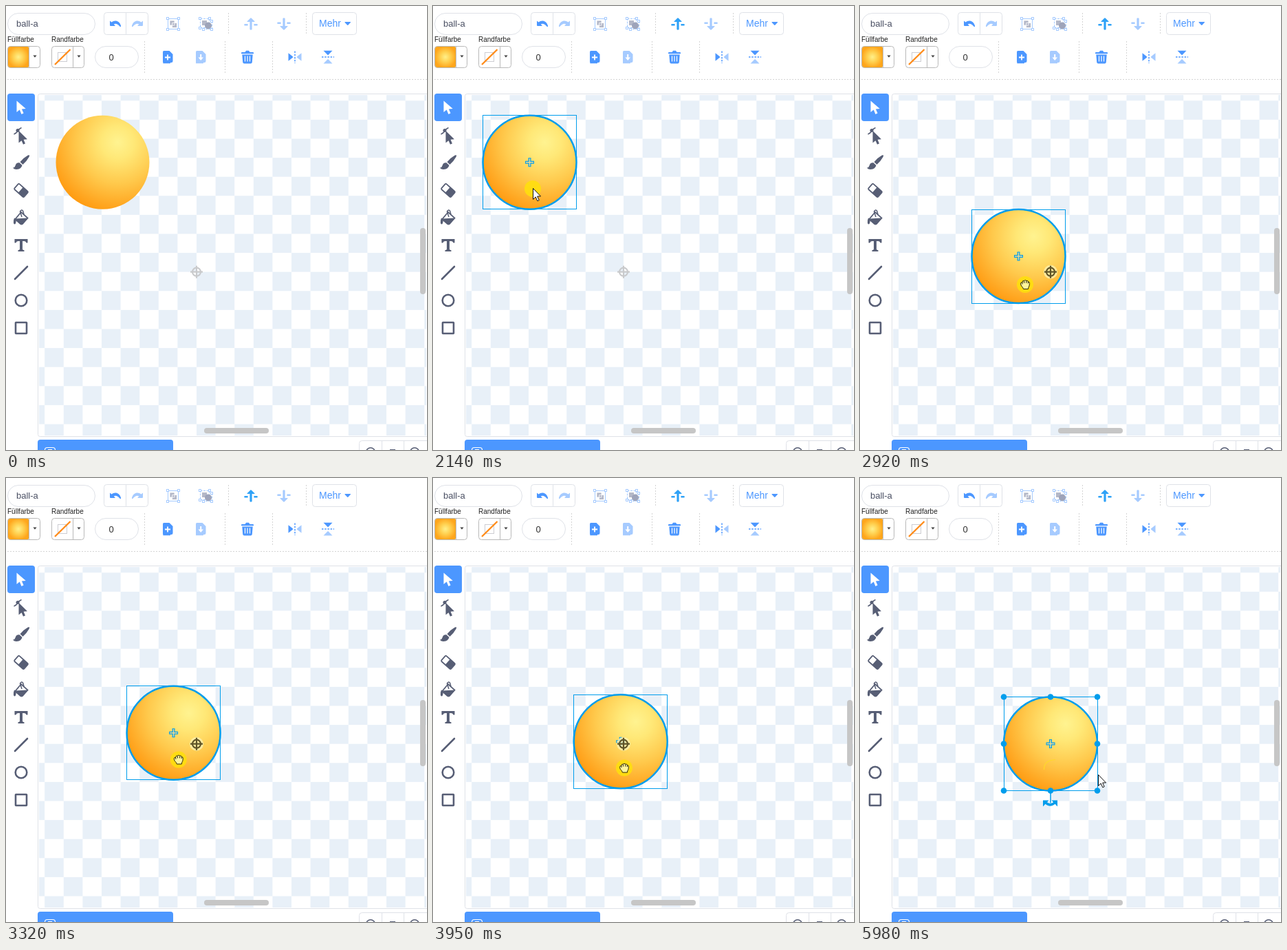
An HTML page for the animation above (6600 ms loop, 612 by 644 pixels).

```html
<!DOCTYPE html>
<html lang="de">
<head>
<meta charset="utf-8">
<title>Ball zentrieren</title>
<style>
  html, body { margin: 0; width: 100%; height: 100%; overflow: hidden; background: #fff; }
  svg { display: block; font-family: "Liberation Sans", Arial, sans-serif; }
  .frame { fill: #fff; stroke: #dfe2e8; }
  .swatch { fill: none; stroke: #b9b9b9; }
  .dash { stroke: #d4d4d4; stroke-dasharray: 2 2; fill: none; }
  .blue { fill: #4c97ff; }
  .pale { fill: #a6cbff; }
  .bar { fill: #c6c6c6; }
  .tool { fill: #575e75; }
  .pen { fill: none; stroke: #575e75; stroke-width: 2.6; }
  .sel { fill: none; stroke: #009dec; }
  .crisp { shape-rendering: crispEdges; }
</style>
</head>
<body>
<svg width="612" height="644" viewBox="0 0 612 644">
  <defs>
    <pattern id="checks" width="55.2" height="55.2" patternUnits="userSpaceOnUse" patternTransform="translate(277 385.7)">
      <path d="M0 0H27.6V27.6H0ZM27.6 27.6H55.2V55.2H27.6Z" fill="#e8f0f8"/>
    </pattern>
    <radialGradient id="gold" gradientUnits="userSpaceOnUse" cx="22" cy="-29" r="108">
      <stop offset="0" stop-color="#fff390"/>
      <stop offset=".22" stop-color="#ffe877"/>
      <stop offset=".55" stop-color="#ffc94c"/>
      <stop offset=".85" stop-color="#ffa722"/>
      <stop offset="1" stop-color="#ff980c"/>
    </radialGradient>
    <radialGradient id="swatch">
      <stop offset="0" stop-color="#fff08a"/>
      <stop offset=".5" stop-color="#ffcf4e"/>
      <stop offset="1" stop-color="#ffa61c"/>
    </radialGradient>
    <path id="undo" d="M151 21.5L153.4 23.5C158 19.6 165 21 167 28.5Q167.4 31.2 165.5 29.8C162.5 25.8 159 25.2 156.8 26.4L158.6 28.4Q158.8 29 158 29H152Q151 29 151 28Z"/>
    <path id="lift" d="M-1.6 8V-3H-5.2Q-6 -3 -5.4 -3.8L-.6 -8.6Q0 -9 .6 -8.6L5.4 -3.8Q6 -3 5.2 -3H1.6V8Q0 9.4 -1.6 8ZM-9.2 0H-4.4V2.4H-9.2Q-10.6 1.2 -9.2 0ZM4.4 0H9.2Q10.6 1.2 9.2 2.4H4.4Z"/>
    <path id="page" d="M-5 -9H3L8 -4V6Q8 8 6 8H-5Q-6.500 8 -6.500 6.500V-7.500Q-6.500 -9 -5 -9Z"/>
    <path id="caret" d="M-2.6 -1.5H2.6L0 1.7Z" fill="#444"/>
    <g id="lens" fill="none" stroke="#575e75" stroke-width="1.6"><circle r="6.300"/></g>
  </defs>

  <!-- first toolbar row -->
  <rect class="frame" x="2.5" y="10.500" width="127" height="31" rx="15.500"/>
  <text x="15" y="30" font-size="13" fill="#4a4f63">ball-a</text>
  <rect class="frame" x="142.500" y="9.500" width="64" height="32" rx="4"/>
  <path d="M174.500 10V41" stroke="#dfe2e8"/>
  <use href="#undo" class="blue"/>
  <use href="#undo" class="pale" transform="translate(350 0) scale(-1 1)"/>

  <g fill="none" stroke="#a6cbff">
    <rect x="235.500" y="18.500" width="15" height="15"/>
    <path d="M282.500 18.500H295.500V31.500H282.500ZM299.500 22V33.500H287" stroke-dasharray="3 1.500"/>
    <g id="knobs" fill="#fff"></g>
  </g>
  <path d="M238 21H245V28H238ZM241.500 24.500H248.500V31.500H241.500Z" fill="#b4b8c8" stroke="#fff" stroke-width=".8"/>
  <path d="M285 21H292V28H285Z" fill="#b4b8c8"/>
  <circle cx="294" cy="28.500" r="5" fill="#9ea4ba"/>

  <use href="#lift" id="raise" class="pale" x="356" y="26"/>
  <use href="#lift" class="pale" transform="translate(404 26) scale(1 -1)"/>
  <rect class="frame" x="445.500" y="9.500" width="64" height="32" rx="4"/>
  <text x="455" y="30" font-size="14" class="blue">Mehr</text>
  <path class="blue" d="M493 23H500.500Q501.600 23 500.800 24L497.500 27.500Q496.700 28.300 496 27.500L492.600 24Q492 23 493 23Z"/>

  <!-- second toolbar row -->
  <g font-size="10" fill="#222">
    <text x="2" y="52">Füllfarbe</text>
    <text x="66" y="52">Randfarbe</text>
  </g>
  <rect x="2.500" y="58.500" width="31" height="31" rx="4" fill="url(#swatch)"/>
  <rect class="swatch" x="2.500" y="58.500" width="47" height="31" rx="4"/>
  <rect class="swatch" x="66.500" y="58.500" width="47" height="31" rx="4"/>
  <path class="swatch" d="M33.500 59V89M97.500 59V89"/>
  <rect x="75.500" y="67.500" width="13" height="13" fill="none" stroke="#cdcdd2"/>
  <path d="M71 85L93.500 63" stroke="#ff8c1a" stroke-width="2.400"/>
  <use href="#caret" x="42" y="73"/>
  <use href="#caret" x="106" y="73"/>
  <rect class="frame" x="129.500" y="58.500" width="63" height="31" rx="15.500"/>
  <text x="149.500" y="78.500" font-size="13" fill="#333">0</text>

  <g class="blue">
    <use href="#page" x="234.500" y="74"/>
    <path d="M235 70.500V78.500M231 74.500H239" stroke="#fff" stroke-width="1.800"/>
    <path d="M229 79V82.500H239" fill="none" stroke="#4c97ff" stroke-width="1.300"/>
  </g>
  <g class="pale">
    <use href="#page" x="282.500" y="74"/>
    <path d="M276.700 79V82.500H287" fill="none" stroke="#a6cbff" stroke-width="1.300"/>
    <path d="M282.200 70H284.200V74.500H287L283.200 79L279.400 74.500H282.200Z" fill="#fff"/>
  </g>
  <path class="blue" d="M343 67H347.500L349 64.800H353L354.500 67H359Q360 67 360 68V69.200H342V68Q342 67 343 67ZM343.300 70.500H358.700L357.800 81.500Q357.600 83.500 355.600 83.500H346.400Q344.400 83.500 344.200 81.500Z"/>
  <path d="M347.500 72.500V80.500M351 72.500V80.500M354.500 72.500V80.500" stroke="#fff" stroke-width="1.200"/>
  <path class="blue" d="M410.500 68.300L416.800 73.300Q417.400 74 416.800 74.700L410.500 79.700Z"/>
  <path class="pale" d="M429.500 68.300L423.200 73.300Q422.600 74 423.200 74.700L429.500 79.700Z"/>
  <path class="blue" d="M461.500 64.700H474.500L468.700 70.700Q468 71.300 467.300 70.700Z"/>
  <path class="pale" d="M461.500 83.500H474.500L468.700 77.500Q468 76.900 467.300 77.500Z"/>
  <path d="M420 65.500V83M459 74H477" stroke="#4c97ff" stroke-width="1.500" stroke-dasharray="2.500 1.700"/>
  <path class="dash" d="M323.500 10V42M436.500 10V42M201.500 51V97M318.500 51V97M387.500 51V97M2 106.500H612"/>

  <!-- tool column -->
  <rect class="blue" x="2" y="127" width="40" height="40" rx="4"/>
  <path d="M15.500 137.500V154L19.800 150.600L22.500 157L25.600 155.600L22.900 149.600L28.800 149Z" fill="#fff"/>
  <path class="tool" d="M18.500 181V198.500L22.600 195.200L25 200.800L28 199.500L25.600 193.800L31 193.200Z"/>
  <path d="M11.500 186Q15 184.500 17.500 181Q19 178 22.500 176.500" class="pen" stroke-width="1.500" style="stroke-width:1.500"/>
  <circle class="tool" cx="17" cy="180.500" r="2.500"/>
  <path class="tool" d="M33.800 216.300Q34.600 217 33.500 219Q29.500 226 24.500 230L20.500 226.300Q25 220.500 31.500 216.800Q33 215.800 33.800 216.300ZM19.400 227.200L23.500 231Q22.500 236.500 15.500 237Q12 237.200 10 234.700Q13 234.300 13.600 231.500Q14.500 227 19.400 227.200Z"/>
  <g transform="translate(22 267.500) rotate(42)">
    <rect class="pen" x="-9.300" y="-5.300" width="18.600" height="10.600" rx="1.500" style="stroke-width:1.800"/>
    <path class="tool" d="M-1 -5.500H9V5.500H-1Z"/>
  </g>
  <path class="pen" d="M13.500 309L22 299L31.500 307.500L24 316Q22.500 317 21 316L14 310Z" style="stroke-width:1.800"/>
  <path class="tool" d="M13 308.500L31.500 307.500L24 316.500Q22.500 317.500 21 316.500ZM12 307.500Q16 309 14.200 315Q12.500 318 11 315Q10.500 311 12 307.500Z"/>
  <path class="pen" d="M23 306L20.500 298Q22 294.800 24.500 297L26 302" style="stroke-width:1.500"/>
  <path class="tool" d="M12.500 338H31.500V343.500H29.500Q29 341 26.500 341H24V352.500Q24 354 26.500 354.300V356H17.500V354.300Q20 354 20 352.500V341H17.500Q15 341 14.500 343.500H12.500Z"/>
  <path class="pen" d="M13 396L31 378" stroke-linecap="round"/>
  <circle class="pen" cx="22" cy="427" r="8.300"/>
  <rect class="pen" x="14" y="459" width="16" height="16" rx=".5"/>

  <!-- drawing area -->
  <rect class="frame" x="46.500" y="127.500" width="580" height="497" rx="3"/>
  <rect x="48" y="129" width="563" height="494" fill="url(#checks)" class="crisp"/>
  <rect class="blue" x="46" y="629" width="197" height="30" rx="4"/>
  <path d="M56.500 644Q56.500 640.500 60 640.500H68Q71.500 640.500 71.500 644M61 643.500H67" fill="none" stroke="#fff" stroke-width="1.200"/>
  <rect class="frame" x="513.500" y="630.500" width="110" height="30" rx="4"/>
  <path d="M546.500 631V644M578.500 631V644" stroke="#dfe2e8"/>
  <use href="#lens" x="530" y="647"/>
  <path d="M558 643.500H566" stroke="#575e75"/>
  <use href="#lens" x="594" y="647"/>

  <g id="ball">
    <circle r="68" fill="url(#gold)"/>
    <circle id="rim" class="sel" r="68" stroke-width="2.500"/>
    <g id="marks">
      <rect class="sel crisp" x="-68" y="-68" width="136" height="136"/>
      <path class="sel" d="M-6.500 0H6.500M0 -6.500V6.500" stroke-width="4"/>
      <path d="M-5.500 0H5.500M0 -5.500V5.500" stroke="#f0dc90" stroke-width="1.500"/>
    </g>
    <g id="handles" fill="#009dec">
      <path class="sel" d="M0 68V86" stroke-width="1.500"/>
      <path class="sel" d="M-7.500 85Q-.500 92 6.500 85" stroke-width="3.500"/>
      <path d="M-11 91V82H-2.500ZM10 91V82H1.500Z"/>
    </g>
  </g>
  <g id="pivot" transform="translate(277 385.700)">
    <circle id="halo" r="10" fill="#fff3b4" opacity=".75"/>
    <g id="cross" fill="none" stroke-width="2.200"><circle r="6"/><path d="M-9 0H9M0 -9V9"/></g>
  </g>
  <rect class="bar" x="602" y="322" width="8" height="96" rx="4"/>
  <rect class="bar" x="288" y="612" width="94" height="8" rx="4"/>

  <path id="trace" d="M267.500 423Q267 409.500 284 408.500" fill="none" stroke="#ffd92a" stroke-width="1.200"/>
  <circle id="press" r="12" fill="#ffdf0c" opacity=".88"/>
  <path id="hand" d="M-6.500 -1Q-6.500 -3.600 -4 -3Q-4 -6.200 -1.500 -5.500Q0 -7.200 2 -5.500Q4.300 -6 4.500 -4Q6.700 -4 6.500 -1.500L6 2Q4.600 4 4.500 6.500H-2.500Q-3 4 -5.500 2ZM-4 -3V-.500M-1.300 -5V-2M1.800 -5V-2M4.400 -4V-1.500" fill="#fff59e" stroke="#2b2708"/>
  <path id="arrow" d="M.5 .5V16.500L4.200 13L6.800 18.800L9.200 17.700L6.700 12H11.500Z" fill="#fff" stroke="#111"/>
</svg>
<script>
const LOOP = 6600;
const $ = id => document.getElementById(id);
const NS = "http://www.w3.org/2000/svg";

function add(parent, tag, attrs) {
  const el = document.createElementNS(NS, tag);
  for (const k in attrs) el.setAttribute(k, attrs[k]);
  parent.append(el);
}

for (const [x, y] of [[235, 18], [251, 18], [235, 34], [251, 34], [282, 18], [296, 18], [282, 32], [299, 22], [299, 34], [287, 34]])
  add($("knobs"), "rect", { x: x - 1.5, y: y - 1.5, width: 3, height: 3 });

for (const x of [-68, 0, 68])
  for (const y of [-68, 0, 68])
    if (x || y) add($("handles"), "circle", { cx: x, cy: y, r: 4.3 });

// Moments at which the screen refreshes: first time, then the gaps after it.
const run = (start, ...gaps) => gaps.reduce((list, g) => [...list, list.at(-1) + g], [start]);
const same = n => Array(n).fill(60);
const TICKS = [
  0,
  ...run(400, ...same(3)),
  ...run(760, 90, ...same(7)),
  1550,
  ...run(2140, 90, ...same(6), 90, 60, 60),
  ...run(2860, 60, 60),
  ...run(3200, 90, ...same(9)),
  ...run(3890, 60, 60, 90),
  4410, 4690, 4750, 5400, 5460,
  ...run(5860, 60, 60)
];

// Paths as [time, x, y]
const BALL = [
  [2140, 140.5, 226.8], [2230, 141.5, 232], [2410, 150, 265], [2590, 156.5, 291.8],
  [2680, 156.5, 292], [2800, 164.5, 299.5], [2860, 201, 337], [2920, 230.5, 363],
  [2980, 236.5, 367], [3200, 238, 367.5], [3410, 251, 373], [3650, 263.5, 379],
  [3710, 265.5, 379.7], [3830, 269, 380], [3890, 271, 381], [4100, 277, 385.5]
];
const POINTER = [
  [400, 378, 609], [460, 292, 505], [520, 219, 414], [580, 189.5, 378],
  [760, 187, 374], [910, 175, 343], [1090, 155, 291], [1270, 145, 264],
  [4690, 145, 264], [4750, 281.5, 421], [5340, 281.5, 421], [5400, 286, 420.5],
  [5460, 290, 420.5], [5800, 290, 420.5], [5860, 309, 424], [5920, 335, 429], [5980, 346, 430]
];

function along(path, t) {
  if (t <= path[0][0]) return path[0].slice(1);
  const i = path.findIndex(p => p[0] > t);
  if (i < 0) return path.at(-1).slice(1);
  const [a, b] = [path[i - 1], path[i]];
  const k = (t - a[0]) / (b[0] - a[0]);
  return [a[1] + (b[1] - a[1]) * k, a[2] + (b[2] - a[2]) * k];
}

const move = (id, [x, y]) => $(id).setAttribute("transform", `translate(${x} ${y})`);
const show = (id, on) => $(id).setAttribute("visibility", on ? "visible" : "hidden");

function draw(time) {
  const n = TICKS.findLastIndex(v => v <= time);
  const t = TICKS[n];
  const ball = along(BALL, t);
  const tip = along(POINTER, t);
  const selected = t >= 1550;
  const grabbing = t >= 2230 && t < 4750;
  const inside = (x, y, r) => Math.hypot(x - ball[0], y - ball[1]) < r;

  // While dragging, the hand runs one refresh ahead of the ball.
  const [nx, ny] = along(BALL, TICKS[n + 1] ?? LOOP);
  const hand = [nx + 3.5, ny + 37];

  move("ball", ball);
  show("rim", selected || (t >= 400 && inside(...tip, 68)));
  show("marks", selected);
  show("handles", t >= 4690);
  $("raise").setAttribute("class", selected ? "" : "pale");
  $("raise").setAttribute("fill", "#2fa2f7");

  const covered = inside(277, 385.7, 68);
  show("pivot", t < 4100);
  show("halo", covered && t < 4100);
  $("cross").setAttribute("stroke", covered ? "#5e5428" : "#c9cacc");

  move("press", grabbing ? hand : [145, 265]);
  show("press", selected && t < 4410);
  show("trace", t >= 4410);
  move("hand", hand);
  show("hand", grabbing);
  move("arrow", tip);
  show("arrow", t >= 400 && !grabbing);
}

const start = performance.now();
function tick() {
  draw((performance.now() - start) % LOOP);
  requestAnimationFrame(tick);
}
tick();
</script>
</body>
</html>
```
